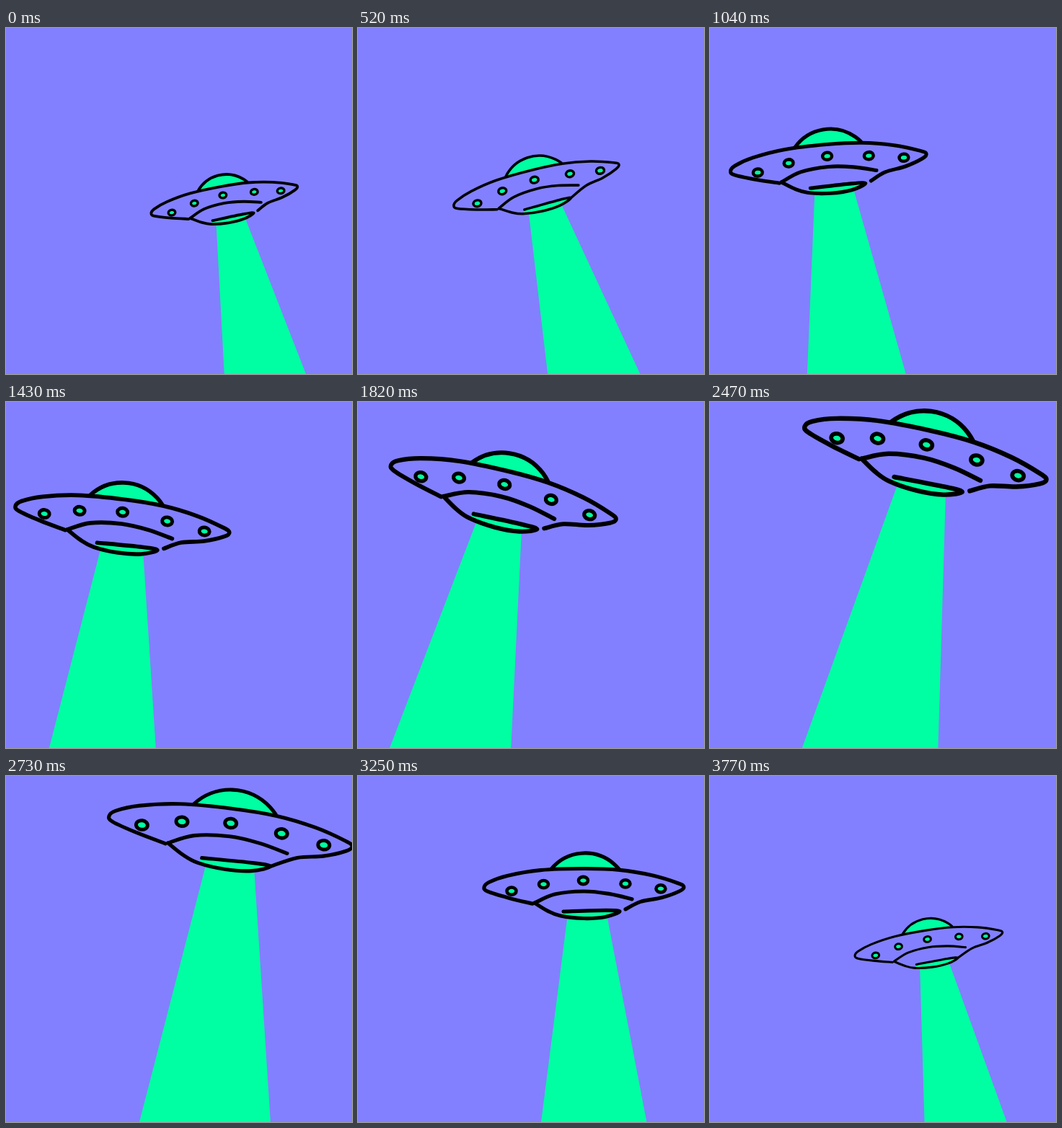
Animation, 480 px wide and 480 px high, one loop 3900 ms. Source, as an HTML page with a canvas:

```html
<!DOCTYPE html>
<html lang="en">
<head>
<meta charset="utf-8">
<title>Flying saucer</title>
<style>
html, body { margin: 0; width: 100%; height: 100%; overflow: hidden; background: #8280ff; }
canvas { display: block; width: 480px; height: 480px; }
</style>
</head>
<body>
<canvas id="stage" width="480" height="480"></canvas>
<script>
const ctx = document.getElementById('stage').getContext('2d');
const SKY = '#8280ff', GLOW = '#00ffa2', INK = '#000';
const STEP = 130, STEPS = 30, SPAN = 278, RAD = Math.PI / 180;

// Key poses of the flight: step, centre x, centre y, tip-to-tip length, tilt in degrees
const flight = [
  [0, 302.5, 238.5, 207, -10.5],
  [4, 247, 218, 237, -14.1],
  [6, 193, 201, 255, -11.7],
  [11, 161, 162.5, 300, 7.1],
  [15, 222, 111, 328, 14.9],
  [17, 271.5, 83, 337, 16.2],
  [21, 311, 76.5, 341, 7.1],
  [25, 313, 154, 278, -0.1],
  [29, 303, 233, 208, -9.1]
];

// The saucer, level and centred on the origin, SPAN units wide
const hullTip = [50, 34];
const body = [[-71, 23], [-104, 15], [-133, 6], [-138, 0], [-131, -7], [-105, -16], [-60, -23.5],
  [0, -25.5], [50, -23.5], [95, -16], [131, -5], [139, 0], [133, 6], [108, 15], [79, 20.5]];
const rim = [[-68, 22], [-40, 10], [0, 6], [35, 9.5], [67, 17]];
const hull = [[-68, 22], [-50, 33], [-32, 40], [0, 43.5], [30, 41.5], hullTip, [30, 32.5], [-28, 34]];
const ports = [[-100, 5.5], [-55.5, -4], [-0.5, -9], [58, -4.5], [107, 2.5]];

function keyAt(i) {
  const n = flight.length, turn = Math.floor(i / n);
  const [step, ...pose] = flight[i - turn * n];
  return [step + turn * STEPS, ...pose];
}

// Periodic cubic spline through the key poses
function poseAt(step) {
  const i = flight.findLastIndex(key => key[0] <= step);
  const [a, b, c, d] = [-1, 0, 1, 2].map(k => keyAt(i + k));
  const h = c[0] - b[0], s = (step - b[0]) / h;
  const slope = (p, q, r, k) => {
    const h0 = q[0] - p[0], h1 = r[0] - q[0];
    return ((q[k] - p[k]) / h0 * h1 + (r[k] - q[k]) / h1 * h0) / (h0 + h1);
  };
  return [1, 2, 3, 4].map(k =>
    (1 + 2 * s) * (1 - s) ** 2 * b[k] + s * s * (3 - 2 * s) * c[k] +
    h * s * (1 - s) ** 2 * slope(a, b, c, k) + h * s * s * (s - 1) * slope(b, c, d, k));
}

function curve(pts) {
  const shape = new Path2D();
  const at = i => pts[Math.max(0, Math.min(pts.length - 1, i))];
  shape.moveTo(...pts[0]);
  for (let i = 0; i < pts.length - 1; i++) {
    const [p, q, r, s] = [-1, 0, 1, 2].map(k => at(i + k));
    shape.bezierCurveTo(q[0] + (r[0] - p[0]) / 6, q[1] + (r[1] - p[1]) / 6,
      r[0] - (s[0] - q[0]) / 6, r[1] - (s[1] - q[1]) / 6, ...r);
  }
  return shape;
}

function oval(x, y) {
  const shape = new Path2D();
  shape.ellipse(x, y, 6.5, 5.1, 0, 0, 2 * Math.PI);
  return shape;
}

function fill(shape, color) {
  ctx.fillStyle = color;
  ctx.fill(shape);
}

function drawBeam() {
  const top = 41, reach = 900, beam = new Path2D();
  beam.moveTo(-22.5, top);
  beam.lineTo(32.5, top);
  beam.lineTo(32.5 + reach * Math.tan(10.8 * RAD), top + reach);
  beam.lineTo(-22.5 - reach * Math.tan(7.4 * RAD), top + reach);
  fill(beam, GLOW);
}

// The rough drawing has a heavier line and leaves a gap beside the hull
function drawSaucer(rough) {
  const dome = new Path2D();
  dome.arc(2, 14, 61, -140 * RAD, -40 * RAD);
  const shell = curve([...body, rough ? [58, 31] : hullTip]);

  fill(dome, GLOW);
  fill(shell, SKY);
  fill(curve(hull.slice(2)), GLOW);

  ctx.strokeStyle = INK;
  ctx.lineCap = ctx.lineJoin = 'round';
  ctx.lineWidth = rough ? 5.2 : 4.2;
  for (const shape of [dome, shell, curve(rim), curve(hull)]) ctx.stroke(shape);

  ctx.lineWidth = rough ? 4.6 : 4.1;
  for (const [x, y] of ports) {
    fill(oval(x - 1, y + 1), GLOW);
    ctx.stroke(oval(x, y));
  }
}

function draw(step) {
  const [x, y, length, tilt] = poseAt(step);
  ctx.setTransform(1, 0, 0, 1, 0, 0);
  ctx.fillStyle = SKY;
  ctx.fillRect(0, 0, 480, 480);
  ctx.translate(x, y);
  ctx.rotate(tilt * RAD);
  ctx.scale(length / SPAN, length / SPAN);
  drawBeam();
  // The two drawings alternate 11 times per loop
  drawSaucer((step * 11 + 5) % STEPS < STEPS / 2);
}

const start = performance.now();
function tick() {
  draw(Math.floor((performance.now() - start) / STEP) % STEPS);
  requestAnimationFrame(tick);
}
tick();
</script>
</body>
</html>
```
